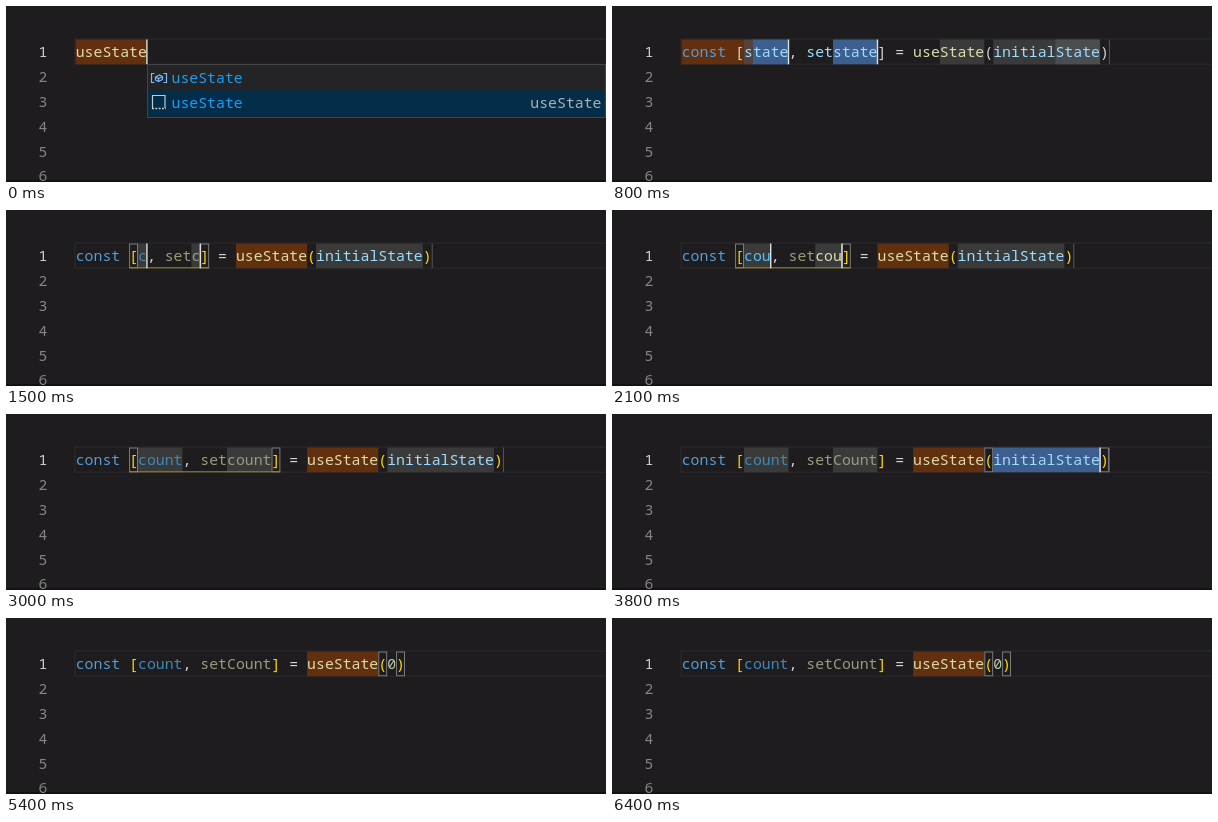
An HTML page that plays this animation: 600x176 px, repeating every 6800 ms.

```html
<!DOCTYPE html>
<html lang="en">
<head>
<meta charset="utf-8">
<title>useState snippet</title>
<style>
html, body { margin: 0; width: 100%; height: 100%; overflow: hidden; background: #1e1c1e; }
svg { display: block; }
text { font: 14.83px "Noto Sans Mono", "DejaVu Sans Mono", monospace; white-space: pre; }
</style>
</head>
<body>
<svg id="stage" width="600" height="176" viewBox="0 0 600 176"></svg>
<script>
const LOOP = 6800, CHAR = 8.9, LEFT = 69.7, TOP = 33.5, ROW = 24.8;
const EXPAND = 800, PARSED = 1000, TAB = 3600, ZERO = 4400, EXIT = 4900;
const KEYS = [1500, 1700, 1900, 2200, 2400];
const BLUE = '#569cd6', VAR = '#9cdcfe', CONST = '#4fc1ff', FUNC = '#dcdcaa', GOLD = '#ffd700';
const PLAIN = '#d4d4d4', DIM_CONST = '#3d8ab4', DIM_FUNC = '#9c9b7c';
const BROWN = '#63300f', GREY = '#3a3a3b', SELECT = '#3c5f8f';
const stage = document.getElementById('stage');

const colX = col => LEFT + col * CHAR;
const rect = (x, y, w, h, fill, more = '') =>
  `<rect x="${x}" y="${y}" width="${w}" height="${h}" fill="${fill}" ${more}/>`;
const label = (x, y, str, fill, anchor = 'start') =>
  `<text x="${x}" y="${y}" fill="${fill}" text-anchor="${anchor}">${str}</text>`;
const mark = (col, n, fill, more) => rect(colX(col), TOP, n * CHAR, ROW, fill, more);
const box = col => rect(colX(col) + .5, TOP + .5, CHAR - 1, ROW - 1, 'none', 'stroke="#858585" stroke-width=".9"');
const caret = col => rect(colX(col) - .7, TOP, 1.4, ROW, '#dededc');

function gutter() {
  let out = rect(0, 174, 600, 2, '#131213');
  for (let i = 0; i < 6; i++)
    out += label(41.5, 51.3 + i * ROW, i + 1, i ? '#858585' : '#d0d0d0', 'end');
  return out + rect(69, 33, 540, 25.2, 'none', 'stroke="#2b2a2c" stroke-width="1"');
}

function popup() {
  const line = 'fill="none" stroke="#75beff" stroke-width="1.2"';
  return rect(141.5, 58.5, 458, 53, '#242325', 'stroke="#454545"') +
    rect(142, 84.5, 457, 26, '#042d49') +
    `<path d="M148.5 67.5h-3v9h3M157.5 67.5h3v9h-3M149.5 71l4-2 3 1.5v3l-4 2-3-1.5zl3 1.5 4-2M152.5 72.5v3" ${line}/>` +
    '<path d="M146.5 102V89.5H159V102" fill="none" stroke="#c8c8c8" stroke-width="1.2"/>' +
    '<path d="M146 102.5H160" stroke="#c8c8c8" stroke-width="1.4" stroke-dasharray="2 1.3"/>' +
    label(165.5, 76.5, 'useState', '#1b9df5') + label(165.5, 101.5, 'useState', '#1b9df5') +
    label(595.5, 101.5, 'useState', '#a9b2b8', 'end');
}

// tokens: [string, colour], placed one after another
function code(tokens) {
  let col = 0, out = '';
  for (const [str, fill] of tokens) {
    if (str.trim()) out += label(colX(col), 51.3, str, fill);
    col += str.length;
  }
  return out;
}

function snippet(t) {
  const typed = KEYS.filter(k => t >= k).length;
  const name = typed ? 'count'.slice(0, typed) : 'state', n = name.length;
  const arg = t < ZERO ? 'initialState' : '0';
  const parsed = t >= PARSED, fresh = typed > 1 && t < 2700;
  const setter = t < TAB ? name : name[0].toUpperCase() + name.slice(1);
  const second = 12 + n, close = second + n, use = close + 4, open = use + 8;
  const start = open + 1, end = start + arg.length;
  const first = t < TAB, bracket = parsed ? GOLD : PLAIN;
  let out = parsed ? mark(use, 8, BROWN) : mark(0, 8, BROWN);

  if (t < EXIT) {
    if (!typed) {
      out += mark(7, n, SELECT, parsed ? '' : 'opacity=".35"') + mark(second, n, SELECT);
      if (!parsed) out += mark(8, n - 1, SELECT);
      out += mark(start, arg.length, GREY) + mark(end - 5, 5, '#4b4d50');
      out += mark(parsed ? use + 3 : use + 3, 5, parsed ? '#65483a' : GREY);
    } else {
      out += mark(7, n, GREY) + mark(second, n, GREY);
      out += mark(start, arg.length, t >= TAB && t < ZERO ? SELECT : GREY);
    }
    out += rect(colX(end + 1), TOP, 1, ROW, '#565658');
  }
  if (parsed) {
    if (first) {
      out += box(6) + box(close);
      out += rect(colX(6), TOP + ROW - 1, (close - 5) * CHAR, 1, '#a08a18');
    } else out += box(open) + box(end);
  }

  out += code([
    ['const', BLUE], [' ', PLAIN], ['[', bracket],
    [name, !parsed ? VAR : fresh ? CONST : DIM_CONST],
    [', ', PLAIN],
    ['set', parsed ? DIM_FUNC : VAR],
    [setter, !parsed ? VAR : fresh ? FUNC : DIM_FUNC],
    [']', bracket], [' ', PLAIN], ['=', PLAIN], [' ', PLAIN],
    ['useState', FUNC], ['(', bracket],
    [arg, t < ZERO ? VAR : '#b5cea8'], [')', bracket]
  ]);

  // the blink restarts with every key
  const last = [EXPAND, ...KEYS, TAB, ZERO, EXIT].filter(k => t >= k).pop();
  if (Math.floor((t - last) / 500) % 2 === 0)
    out += first ? caret(7 + n) + caret(close) : caret(t < EXIT ? end : end + 1);
  return out;
}

function scene(t) {
  if (t >= EXPAND) return gutter() + snippet(t);
  return gutter() + mark(0, 8, BROWN) + code([['useState', FUNC]]) + caret(8) + popup();
}

let shown = '';
function frame(now) {
  const next = scene(now % LOOP);
  if (next !== shown) stage.innerHTML = shown = next;
  requestAnimationFrame(frame);
}
frame(0);
</script>
</body>
</html>
```
